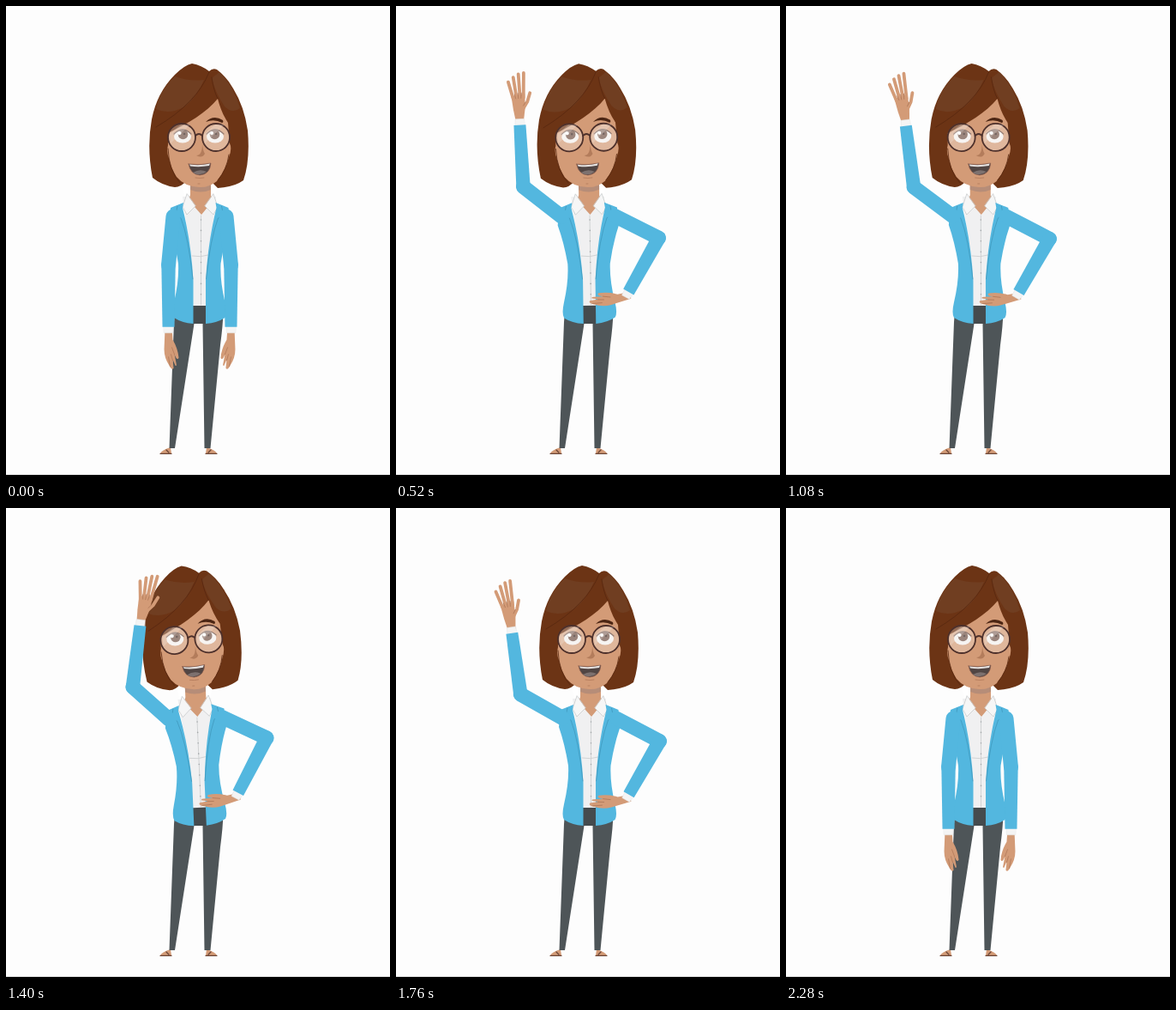
An HTML page that plays this animation: 448 by 552 pixels, repeating every 2.32 s.

```html
<!DOCTYPE html>
<html lang="en">
<head>
<meta charset="utf-8">
<title>Waving woman</title>
<style>
html, body { margin: 0; width: 100%; height: 100%; overflow: hidden; background: #fdfdfd; }
svg { display: block; width: 448px; height: 552px; }
.skin { fill: #d39b77; }
.finger { stroke: #d39b77; stroke-width: 3.8; }
.blue { fill: #53b7df; }
.fold { stroke: #b0795a; stroke-width: .8; }
</style>
</head>
<body>
<svg viewBox="0 0 448 552" fill="none" stroke-linecap="round" stroke-linejoin="round">
  <rect y="546" width="448" height="6" fill="#000"/>

  <g id="foot">
    <path class="skin" d="M192 514L193 521H180Q182 517 192 514"/>
    <path stroke="#6b4536" stroke-width="1.3" d="M180 521.3H193M187 517L190 520"/>
  </g>
  <use href="#foot" transform="translate(426) scale(-1 1)"/>
  <path fill="#4e5558" d="M197 355H253Q254 364 250 395L238.500 515H231.500L229.500 370H219.500L197 515H190.500L196 368Z"/>
  <path fill="#454b4e" d="M217 348H234V370H217Z"/>

  <g id="body">
    <path id="stand" fill="#fff" d="M204 203L211 204L218 220L209 226Z"/>
    <use href="#stand" transform="translate(452) scale(-1 1)"/>
    <path fill="#f0f0f1" d="M206 222H245L240 270L234 349H218L212 265Z"/>
    <path class="skin" d="M215 205H239V221L242 226L228 243L213 226L215 220Z"/>
    <path fill="#b68d78" d="M215 208H239V214Q227 219 215 214Z"/>
    <path stroke="#c9cccd" stroke-width=".8" d="M217 291Q227 293 236 290M227.500 244V348"/>
    <path stroke="#a4a8aa" stroke-width="1.600" stroke-dasharray="0 12.400" d="M227.500 249V340"/>
    <path id="collar" fill="#f6f6f6" stroke="#c9cccd" stroke-width=".8" d="M211 219L206 234L211 243L221 233Z"/>
    <use href="#collar" transform="translate(453) scale(-1 1)"/>
    <g id="panel">
      <path class="blue" d="M207 229L192 235L190 255Q197 275 201 300Q202 320 196 345Q193 358 196 363Q205 369 218.500 370V320Q216 275 206 235Z"/>
      <path stroke="#3d94b8" stroke-width=".7" d="M200 233L198 243L204 247Q213 270 218 318"/>
    </g>
    <use href="#panel" transform="translate(451.500) scale(-1 1)"/>

    <g id="head">
      <path fill="#6c3415" d="M217 67Q228 69 237 76Q241 72 246 74Q257 82 265 96Q278 117 282 145Q285 180 277 203Q266 211 247 212L239 204H210Q204 211 197 211Q182 209 171 200Q164 165 170 132Q176 101 197 80Q208 69 217 67Z"/>
      <path fill="#703e21" d="M197 82Q179 99 175 120Q190 127 207 118Q220 110 231 86Q214 88 197 82ZM249 77Q266 94 273 119Q264 126 255 117Q244 101 240 84Z"/>
      <path class="skin" d="M189 148C212 137 234 124 247 108Q251 124 259 136L261 160Q264 166 260 176Q257 190 246 204Q236 212 225 211Q208 210 199 199Q192 188 190 177Q187 170 189 162Z"/>
      <path stroke="#572710" stroke-width=".8" d="M237 77Q223 113 175 141M240 83Q242 98 247 108M189 166Q190 192 203 206M260 173Q258 190 247 203"/>
      <path fill="#4c2614" d="M233 135Q242 126 253 133Q254 136 252 136Q243 131 233 135Z"/>
      <g id="eye">
        <ellipse fill="#f3f0ed" cx="206" cy="152" rx="10" ry="7.500"/>
        <circle fill="#75574b" cx="206.500" cy="149.500" r="5.800"/>
        <path stroke="#6b4c40" stroke-width="1.200" d="M196 149Q206 139 216 149"/>
      </g>
      <use href="#eye" transform="translate(450) scale(-1 1)"/>
      <path stroke="#fff" stroke-width="4" d="M202.500 148h.1M240 148h.1"/>
      <path stroke="#3f2a24" stroke-width="2.500" d="M208 149h.1M245 149h.1"/>
      <g id="lids">
        <g id="lid">
          <path fill="#c39680" d="M194 142H218V156Q206 166 194 156Z"/>
          <path stroke="#49342e" stroke-width="1.300" d="M195 154Q206 160 217 154"/>
        </g>
        <use href="#lid" transform="translate(450) scale(-1 1)"/>
      </g>
      <g id="lens">
        <circle fill="#fff" fill-opacity=".28" stroke="#4d302b" stroke-width="1.800" cx="205" cy="153" r="16"/>
      </g>
      <use href="#lens" x="40"/>
      <path stroke="#4d302b" stroke-width="1.800" d="M221 151Q225 147 229 151"/>
      <path id="glare" fill="#fff" fill-opacity=".2" d="M191 149L204 138H215L192 160Z"/>
      <use href="#glare" x="40"/>
      <path fill="#b37c5b" d="M229 161Q230 169 232 172Q229 178 222 174Q229 174 229 161Z"/>
      <path fill="#514543" stroke="#8e5f4f" stroke-width=".7" d="M213 184Q226 186 239 183Q238 196 226 197Q215 196 213 184Z"/>
      <path fill="#e6e2e0" d="M214 184.500Q226 186.500 238 183.500L237 186Q226 188 215 186.500Z"/>
      <path fill="#7d716f" d="M218 194Q226 189 234 193Q226 199 218 194Z"/>
      <path class="fold" d="M221 200Q226 201 231 200M224 207h2"/>
    </g>

    <g id="left"></g>
    <g id="right" transform="translate(452) scale(-1 1)"></g>
  </g>
</svg>
<script>
const $ = s => document.querySelector(s);
const SHOULDER = [195, 245], UPPER = 57, STEP = 40, LOOP = 2320;

// Four spread fingers, the middle ones longest.
const fingers = [0, 1, 2, 3]
  .map(i => `M${5 - 4 * i} 25L${9 - 6.3 * i} ${54 - (3 - i) ** 2}`).join('');

// Limbs point straight down at angle 0; the right arm is a mirror image.
$('#left').innerHTML = $('#right').innerHTML = `
  <path class="upper" stroke="#53b7df" stroke-width="17"/>
  <g class="fore">
    <g class="hand">
      <g class="relaxed">
        <path class="skin" d="M-4 -5L-5 20Q-5 30 1 39Q4 45 6 42L5 32L8 39Q10 40 9 36L7 26Q10 34 12 30Q11 19 5 9L4 -5Z"/>
        <path class="fold" d="M2 40L0 29M5 33L3 26M7 26L4 18"/>
      </g>
      <g class="open">
        <path class="skin" d="M-4 -5L-8 14L-9 30L7 28L6 12L4 -5Z"/>
        <path class="finger" d="${fingers}M-5 12L-11 20L-15 30"/>
        <path class="fold" d="M3 30L2 25M-1 31V25M-5 31L-4 25M-9 20L-6 16"/>
      </g>
    </g>
    <path fill="#f4f4f4" stroke="#e2e4e5" stroke-width=".5" d="M-5.500 70H5.500L5 79H-5Z"/>
    <path class="blue" d="M-8.200 0A8.200 8.200 0 0 1 8.200 0L7 72H-7Z"/>
  </g>`;

// Smooth step from 0 to 1 between times a and b.
function ease(a, b, t) {
  const u = Math.min(1, Math.max(0, (t - a) / (b - a)));
  return u * u * (3 - 2 * u);
}

function poseArm(id, upper, fore, hand) {
  const part = name => $(`#${id} .${name}`);
  const a = upper * Math.PI / 180, [x, y] = SHOULDER;
  const ex = x - UPPER * Math.sin(a), ey = y + UPPER * Math.cos(a);
  part('upper').setAttribute('d', `M${x} ${y}L${ex} ${ey}`);
  part('fore').setAttribute('transform', `translate(${ex} ${ey}) rotate(${fore})`);
  part('hand').setAttribute('transform', `translate(0 78) rotate(${hand})`);
  const open = fore > 40;
  part('open').style.display = open ? '' : 'none';
  part('relaxed').style.display = open ? 'none' : '';
}

function draw() {
  const t = Math.floor(performance.now() % LOOP / STEP) * STEP;

  // The arms go down the way they came up; the forearm leads the raise.
  const m = Math.min(t, 2240 - t);
  const lift = ease(190, 530, m), bend = ease(160, 400, m), hip = ease(160, 490, m);

  // Two waves, with the body leaning into each.
  const phase = (t - 1040) / 640;
  const wave = Math.abs(phase) < 1 ? (1 - Math.cos(2 * Math.PI * phase)) / 2 : 0;

  poseArm('left', 5.5 + 121 * lift + 8 * wave, 172 * bend + 18 * wave, 15 * bend - 20 * lift + 9 * wave);
  poseArm('right', 5.5 + 57 * hip, -30 * hip, -46 * hip);
  $('#body').setAttribute('transform', `rotate(${-2.6 * wave} 225 350)`);

  const blink = ease(100, 0, Math.abs(t - 760));
  $('#lids').setAttribute('transform', `translate(0 ${142 * (1 - blink)}) scale(1 ${blink})`);
  $('#lids').style.display = blink ? '' : 'none';
  requestAnimationFrame(draw);
}
draw();
</script>
</body>
</html>
```
